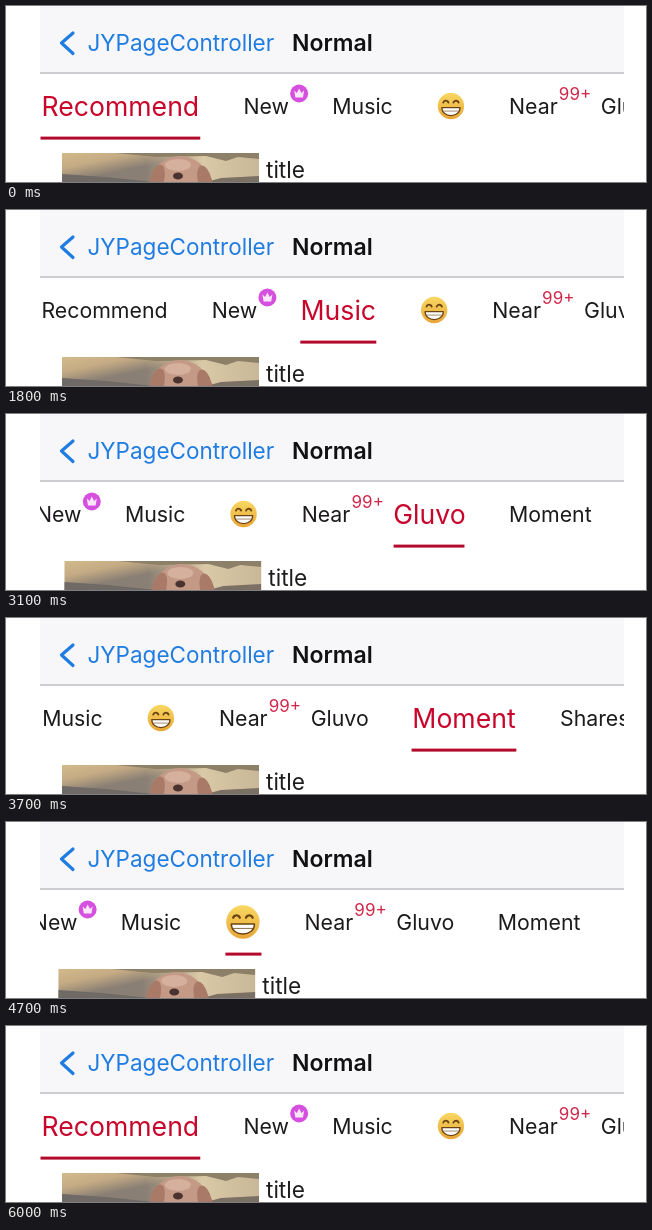
Recreate the animation shown at these times as an HTML page with a canvas. Size 640x176 px, loop 6.1 s.

```html
<!DOCTYPE html>
<html lang="en">
<head>
<meta charset="utf-8">
<title>Page controller</title>
<style>
html, body { margin: 0; width: 100%; height: 100%; overflow: hidden; background: #fff; }
canvas { display: block; width: 640px; height: 176px; }
</style>
</head>
<body>
<canvas id="stage" width="640" height="176"></canvas>
<script>
const ctx = document.getElementById('stage').getContext('2d');
const LOOP = 6100, STEP = 100;
const LEFT = 34, RIGHT = 618, PAGE = RIGHT - LEFT;
const GAP = 44.4, GROW = 0.25, FONT = 21.3;
const EMPTY_PAGE = 1;

const tabs = [
  ['Recommend', 127], ['New', 44], ['Music', 60], ['', 28],
  ['Near', 48], ['Gluvo', 56], ['Moment', 83], ['Shares', 69],
].map(([label, width]) => ({ label, width }));

// Each swipe: start ms, end ms, page reached
const swipes = [
  [520, 1180, 1], [1250, 1790, 2], [1850, 2170, 3], [2170, 2620, 4],
  [2650, 3130, 5], [3180, 3620, 6], [3720, 4080, 5], [4090, 4470, 4],
  [4470, 4720, 3], [4720, 4970, 2], [4970, 5266, 1], [5320, 5850, 0],
];

const clamp = (v, lo = 0, hi = 1) => Math.min(hi, Math.max(lo, v));
const mix = (a, b, k) => a + (b - a) * k;
const easeOut = u => 1 - (1 - u) ** 2;
const easeInOut = u => u < 0.5 ? 4 * u ** 3 : 1 - 4 * (1 - u) ** 3;

function layout(position) {
  let x = 35;
  const items = tabs.map((tab, i) => {
    const active = clamp(1 - Math.abs(position - i));
    const width = tab.width * (1 + GROW * active);
    const item = { ...tab, active, x, width, center: x + width / 2 };
    x += width + GAP;
    return item;
  });
  items.maxScroll = x - GAP - 617;
  return items;
}

const scrollTargets = tabs.map((_, i) => {
  const items = layout(i);
  return clamp(items[i].center - (LEFT + RIGHT) / 2, 0, items.maxScroll);
});

// The tab bar recentres only once a swipe has landed
function poseAt(t) {
  let position = 0, scroll = 0;
  for (const [start, end, page] of swipes) {
    position = mix(position, page, easeOut(clamp((t - start) / (end - start))));
    scroll = mix(scroll, scrollTargets[page], easeInOut(clamp((t - end) / 300)));
  }
  return { position, scroll };
}

function text(str, x, y, size, color, weight = 400, align = 'left') {
  ctx.font = `${weight} ${size}px Inter, sans-serif`;
  ctx.textAlign = align;
  ctx.fillStyle = color;
  ctx.fillText(str, x, y);
}

function rect(x, y, w, h, color) {
  ctx.fillStyle = color;
  ctx.fillRect(x, y, w, h);
}

function ellipse(x, y, rx, ry, color, angle = 0) {
  ctx.fillStyle = color;
  ctx.beginPath();
  ctx.ellipse(x, y, rx, ry, angle, 0, 7);
  ctx.fill();
}

function shape(points, color) {
  ctx.fillStyle = color;
  ctx.beginPath();
  points.forEach(([x, y]) => ctx.lineTo(x, y));
  ctx.closePath();
  ctx.fill();
}

function gradient(x0, y0, x1, y1, ...colors) {
  const fill = ctx.createLinearGradient(x0, y0, x1, y1);
  colors.forEach((color, i) => fill.addColorStop(i / (colors.length - 1), color));
  return fill;
}

function drawHeader() {
  rect(LEFT, 0, PAGE, 66, '#f7f6f9');
  rect(LEFT, 66, PAGE, 2, '#cdccd0');
  ctx.strokeStyle = '#1f7ce0';
  ctx.lineWidth = 3.2;
  ctx.lineCap = ctx.lineJoin = 'round';
  ctx.stroke(new Path2D('M67 27L55.5 37L67 47.5'));
  text('JYPageController', 81.5, 45, 22.5, '#1f7ce0');
  text('Normal', 286, 45, 23, '#111', 600);
}

function drawGrin(x, y, r) {
  ctx.save();
  ctx.translate(x, y);
  ctx.scale(r / 13, r / 13);
  ellipse(0, 0, 13, 13, gradient(0, -13, 0, 13, '#f8d862', '#e8a637'));
  ctx.strokeStyle = '#6b4312';
  ctx.lineWidth = 1.8;
  for (const side of [-5, 5]) {
    ctx.beginPath();
    ctx.arc(side, -2.5, 2.7, Math.PI * 1.1, Math.PI * 1.9);
    ctx.stroke();
  }
  const mouth = new Path2D('M-9 1.5H9C9 12-9 12-9 1.5Z');
  ctx.fillStyle = '#fff';
  ctx.fill(mouth);
  ctx.lineWidth = 1.2;
  ctx.stroke(mouth);
  ctx.lineWidth = 0.6;
  ctx.stroke(new Path2D('M-8 5H8'));
  ctx.restore();
}

function drawCrownBadge(x, y) {
  ellipse(x, y, 9, 9, '#d650e0');
  shape([[x - 5, y - 3], [x - 2.3, y - 0.5], [x, y - 5], [x + 2.3, y - 0.5],
    [x + 5, y - 3], [x + 3.8, y + 4], [x - 3.8, y + 4]], '#fbe6fc');
}

function drawTabs(position, scroll) {
  const items = layout(position);
  ctx.save();
  ctx.translate(-Math.min(scroll, items.maxScroll), 0);
  for (const { label, x, width, center, active } of items) {
    const size = FONT * (1 + GROW * active);
    const color = `rgb(${mix(28, 200, active)}, ${mix(26, 5, active)}, ${mix(28, 42, active)})`;
    const end = x + width;
    if (label) text(label, center, 100 + size * 0.364, size, color, 400, 'center');
    else drawGrin(center, 100, width / 2 - 0.8);
    if (label === 'New') drawCrownBadge(end + 11, 87.5 - 2.5 * active);
    if (label === 'Near') text('99+', end + 1.5, 94 - 3 * active, 17, '#d0284a');
  }
  const i = Math.floor(position), k = position - i;
  const center = mix(items[i].center, items[i + 1].center, k);
  const width = mix(items[i].width, items[i + 1].width, k) + 1;
  rect(center - width / 2, 130.6, width, 3, '#b30a2b');
  ctx.restore();
}

function drawPhoto() {
  ctx.save();
  ctx.beginPath();
  ctx.rect(56, 147, 197, 29);
  ctx.clip();
  rect(56, 147, 197, 29, gradient(56, 147, 62, 176, '#d3b98a', '#c4ab84', '#8a7f74'));
  rect(140, 147, 113, 29, gradient(140, 0, 253, 0, '#d9c69c00', '#dac9a6', '#c9b898'));
  shape([[110, 147], [253, 147], [253, 153], [232, 151], [220, 155], [200, 150], [150, 151]], '#8d8068');
  shape([[56, 168], [100, 171], [148, 176], [56, 176]], '#6f6a66');
  shape([[253, 170], [215, 172], [200, 176], [253, 176]], '#7b7064');
  ellipse(174, 175, 28, 25, '#c49a87');
  ellipse(151, 174, 7, 16, '#a97a67', 0.25);
  ellipse(199, 175, 7, 16, '#a97a67', -0.25);
  ellipse(172, 159, 13, 6, '#d5b09d');
  ellipse(172, 170, 5, 3.5, '#4a3230');
  ctx.restore();
}

function drawPages(position) {
  for (let page = 0; page < 7; page++) {
    const offset = (page - position) * PAGE;
    if (page === EMPTY_PAGE || Math.abs(offset) >= PAGE) continue;
    ctx.save();
    ctx.translate(offset, 0);
    drawPhoto();
    text('title', 260, 172, 22.6, '#1c1c1c');
    ctx.restore();
  }
}

function drawCursor(t) {
  const u = (t - 5200) / 100;
  if (Math.abs(u) > 1) return;
  ctx.save();
  ctx.translate(543 + 14 * u, 125 + 50 * u * u);
  const arrow = new Path2D('M0 0V17L4 13.5L7 20L10 18.6L7.2 12.5H12Z');
  ctx.strokeStyle = '#fff';
  ctx.lineWidth = 2;
  ctx.stroke(arrow);
  ctx.fillStyle = '#111';
  ctx.fill(arrow);
  ctx.restore();
}

function draw(t) {
  const { position, scroll } = poseAt(t);
  rect(0, 0, 640, 176, '#fff');
  ctx.save();
  ctx.beginPath();
  ctx.rect(LEFT, 0, PAGE, 176);
  ctx.clip();
  drawHeader();
  drawPages(position);
  drawTabs(position, scroll);
  drawCursor(t);
  ctx.restore();
}

const began = performance.now();
function tick() {
  const t = (performance.now() - began) % LOOP;
  draw(Math.floor(t / STEP) * STEP);
  requestAnimationFrame(tick);
}
tick();
</script>
</body>
</html>
```
